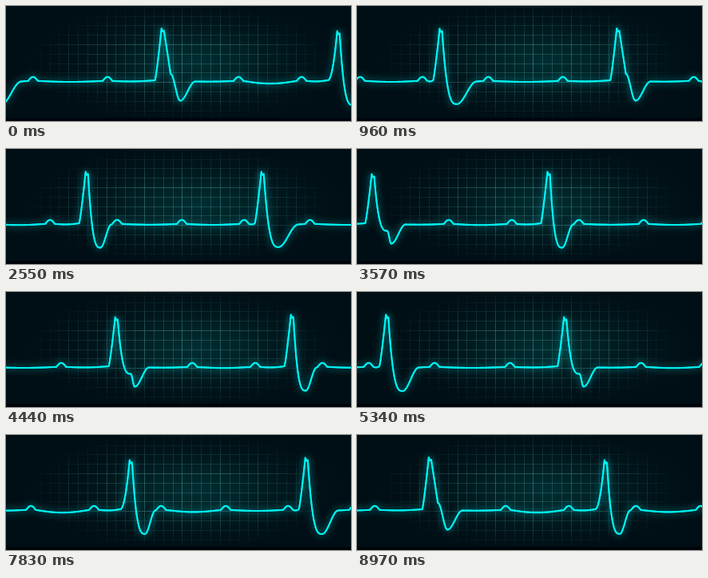
Animation of 432x144 px, one loop 9 s. Source, as an HTML page with a canvas:

```html
<!DOCTYPE html>
<html lang="en">
<head>
<meta charset="utf-8">
<title>Heartbeat monitor</title>
<style>
html, body { margin: 0; width: 100%; height: 100%; overflow: hidden; background: #000f15; }
canvas { display: block; }
</style>
</head>
<body>
<canvas id="stage" width="432" height="144"></canvas>
<script>
const W = 432, H = 144, LOOP = 9000;
const HALF = 663, PERIOD = 1324.8;   // two slightly different runs of three beats
const SPEED = 0.136, START = 196, BASE = 93.8;
const ctx = document.getElementById('stage').getContext('2d');

// ---- background ----
function layer() {
  const c = document.createElement('canvas');
  c.width = W;
  c.height = H;
  return c.getContext('2d');
}

// Radial gradient squeezed into an ellipse over the whole layer
function ellipse(g, x, y, rx, ry, stops) {
  const grad = g.createRadialGradient(0, 0, 0, 0, 0, rx);
  stops.forEach(([at, color]) => grad.addColorStop(at, color));
  g.save();
  g.translate(x, y);
  g.scale(1, ry / rx);
  g.fillStyle = grad;
  g.fillRect(-W, -W * 2, W * 2, W * 4);
  g.restore();
}

function makeGrid() {
  const g = layer();
  for (let i = -20; i <= 20; i++) {
    g.fillStyle = `rgba(66,135,135,${i % 4 ? 0.42 : 0.66})`;
    g.fillRect(Math.round(220.4 + i * 11.85), 0, 1, H);
    g.fillRect(0, Math.round(48 + i * 11.8), W, 1);
  }
  g.globalCompositeOperation = 'destination-in';
  ellipse(g, 218, 70, 192, 76, [
    [0, 'rgba(0,0,0,1)'], [0.35, 'rgba(0,0,0,.8)'],
    [0.7, 'rgba(0,0,0,.4)'], [1, 'rgba(0,0,0,0)']
  ]);
  return g.canvas;
}

function makeBack() {
  const g = layer();
  g.fillStyle = '#000f15';
  g.fillRect(0, 0, W, H);
  ellipse(g, 236, 70, 200, 80, [
    [0, 'rgba(0,48,51,.95)'], [0.3, 'rgba(0,40,44,.8)'],
    [0.65, 'rgba(0,26,32,.5)'], [1, 'rgba(0,15,21,0)']
  ]);
  g.drawImage(makeGrid(), 0, 0);
  g.fillStyle = '#00050b';
  g.fillRect(0, 140, W, 4);
  return g.canvas;
}

// ---- trace ----
const line = u => u;
const wave = u => (1 - Math.cos(Math.PI * u)) / 2;
const drop = u => 1 - (1 - u) ** 3;

const trace = new Path2D();
const pen = { x: -PERIOD * 2 - 100, y: BASE };
trace.moveTo(pen.x, pen.y);

// Eased stretch to (x, y), with an optional arch (positive hangs down)
function to(x, y, ease = line, arch = 0) {
  const { x: x0, y: y0 } = pen;
  const n = Math.max(1, Math.ceil((x - x0) * 2));
  for (let i = 1; i <= n; i++) {
    const u = i / n;
    trace.lineTo(x0 + (x - x0) * u, y0 + (y - y0) * ease(u) + arch * Math.sin(Math.PI * u));
  }
  pen.x = x;
  pen.y = y;
}

function bump(x, sag = 1.2) {
  to(x - 6, BASE, line, sag);
  to(x + 6, BASE, line, -5);
}

function beat(x, { top, dip, end, knee, fall = drop, lead = 9.5, bend = 1.2 }) {
  to(x - lead, 93, line, 1);
  to(x - 1.4, top, u => u ** bend);
  to(x, top + 4);
  to(x + 1.7, top + 3);
  if (knee) to(x + knee[0], knee[1], fall);
  to(x + dip[0], dip[1], knee ? wave : drop);
  to(x + end, 94.5, wave);
}

function run(x, odd) {
  bump(x - 69);
  beat(x, odd
    ? { top: 31.5, knee: [18, 102.5], dip: [23, 118.5], end: 41 }
    : { top: 28, knee: [10, 85], fall: line, dip: [22, 118.5], end: 41 });
  bump(x + 95, 0.5);
  bump(x + 174, odd ? 1.4 : 3.4);
  beat(x + 220, odd
    ? { top: 28.5, dip: [17, 123.5], end: 31 }
    : { top: 31.5, dip: [17.8, 123.8], end: 31, lead: 13, bend: 2 });
  bump(x + 258, 0);
  bump(x + 339, odd ? 1 : 2.6);
  bump(x + 417);
  beat(x + 440, odd
    ? { top: 28.5, dip: [20, 122.8], end: 45 }
    : { top: 28.5, dip: [19.5, 124], end: 40 });
  bump(x + 499.5, 0);
}

for (let n = -2; n <= 0; n++) {
  run(n * PERIOD, 0);
  run(n * PERIOD + HALF, 1);
}

// ---- animation ----
const back = makeBack();

function glow(width, color, blur, shade) {
  ctx.lineWidth = width;
  ctx.strokeStyle = color;
  ctx.shadowBlur = blur;
  ctx.shadowColor = shade;
  ctx.stroke(trace);
}

function draw(now) {
  const t = now % LOOP;
  ctx.drawImage(back, 0, 0);
  ctx.save();
  ctx.translate((START + t * SPEED) % PERIOD, 0);
  ctx.lineJoin = 'round';
  glow(2.1, '#00e4e6', 10, 'rgba(0,225,230,.8)');
  glow(1.8, '#00f4f2', 0, 'transparent');
  ctx.restore();
}

const begin = performance.now();
function tick() {
  draw(performance.now() - begin);
  requestAnimationFrame(tick);
}
tick();
</script>
</body>
</html>
```
